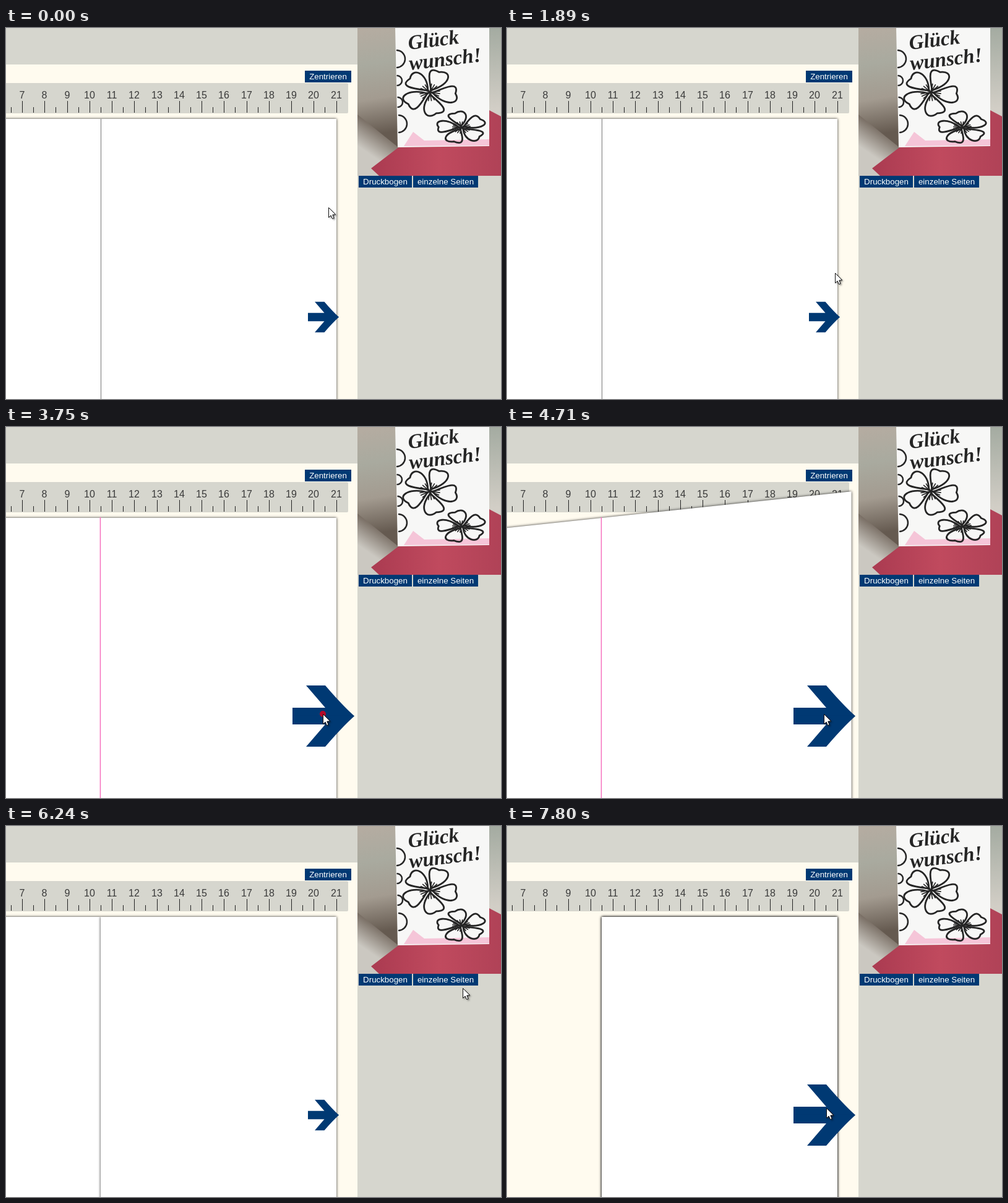
Write an HTML page with a canvas that moves like this. It is 800 px wide and 600 px high and loops after 8000 ms.

```html
<!DOCTYPE html>
<html lang="de">
<head>
<meta charset="utf-8">
<title>Karte wenden</title>
<style>
html, body { margin: 0; width: 100%; height: 100%; overflow: hidden; background: #d6d6ce; }
canvas { display: block; }
</style>
</head>
<body>
<canvas id="stage" width="800" height="600"></canvas>
<script>
const LOOP = 8000;
const GRAY = '#d6d6ce', CREAM = '#fffbef', NAVY = '#003973', INK = '#252525';
const SPINE = 153, HALF = 381, TOP = 147, MIDDLE = 685, DEPTH = 1000;
const SANS = '"Liberation Sans", Arial, sans-serif';
const ctx = document.getElementById('stage').getContext('2d');

const TURN_DELAY = 455, TURN_TIME = 600, GROW_TIME = 300, DOT_TIME = 300;
const [OPEN, BACK, CLOSE] = [2135, 3747, 6735];
const SINGLE_FROM = 6200;
const HOVERS = [[2030, 4990], [6705, LOOP + GROW_TIME]];
const REST = { x: 521, y: 290 };
const MOVES = [
  { at: 160, time: 800, x: 638, y: 242 },
  { at: 990, time: 350, x: 572, y: 243 },
  { at: 1550, time: 540, x: 512, y: 464 },
  { at: 4880, time: 500, x: 754, y: 248 },
  { at: 6150, time: 570, x: 516, y: 456 }
];

const ease = v => (v = Math.max(0, Math.min(1, v)), v * v * (3 - 2 * v));
const turned = (t, click) => ease((t - click - TURN_DELAY) / TURN_TIME);

function poly(c, fill, ...pts) {
  c.beginPath();
  pts.forEach(([x, y]) => c.lineTo(x, y));
  c.closePath();
  c.fillStyle = fill;
  c.fill();
}

function box(c, fill, x, y, w, h) {
  c.fillStyle = fill;
  c.fillRect(x, y, w, h);
}

function gradient(c, x0, y0, x1, y1, ...colors) {
  const g = c.createLinearGradient(x0, y0, x1, y1);
  colors.forEach((color, i) => g.addColorStop(i / (colors.length - 1), color));
  return g;
}

function label(c, text, x, y, font, fill) {
  c.font = font;
  c.fillStyle = fill;
  c.textAlign = 'center';
  c.fillText(text, x, y);
}

function button(c, text, x, y, w) {
  box(c, NAVY, x, y, w, 19);
  label(c, text, x + w / 2, y + 14, `13.333px ${SANS}`, '#fff');
}

function flower(c, cx, cy, rx, ry, lean) {
  for (let i = 0; i < 5; i++) {
    const at = (da, r) => {
      const a = lean + da + i * Math.PI * .4;
      return [cx + Math.cos(a) * rx * r, cy + Math.sin(a) * ry * r];
    };
    c.lineWidth = 2.8;
    c.beginPath();
    c.moveTo(...at(0, .1));
    c.bezierCurveTo(...at(-.5, .5), ...at(-.6, 1.2), ...at(-.1, .92));
    c.bezierCurveTo(...at(.25, 1.25), ...at(.7, .85), ...at(0, .1));
    c.stroke();
    c.lineWidth = 1.6;
    for (const d of [-.3, 0, .3]) {
      c.beginPath();
      c.moveTo(cx, cy);
      c.lineTo(...at(d, .36));
      c.stroke();
    }
  }
}

function lettering(c, text, x, y) {
  c.save();
  c.translate(x, y);
  c.rotate(-.12);
  label(c, text, 0, 0, 'italic bold 33px "Liberation Serif", Times, serif', INK);
  c.restore();
}

function photo(c) {
  c.save();
  c.beginPath();
  c.rect(568, 0, 232, 239);
  c.clip();
  box(c, gradient(c, 585, 0, 612, 170, '#b5aca1', '#a9aa9f', '#a39b90', '#655a50'), 568, 0, 70, 239);
  poly(c, gradient(c, 606, 165, 582, 200, '#766b61', '#cbc8c1'), [568, 140], [634, 193], [640, 239], [568, 239]);
  box(c, gradient(c, 781, 0, 781, 130, '#a4aba1', '#d2cec6'), 781, 0, 19, 145);
  poly(c, gradient(c, 600, 215, 800, 215, '#ac3c52', '#c04a5e', '#b04257'),
    [590, 227], [637, 191], [781, 191], [781, 133], [800, 143], [800, 239], [603, 239]);
  poly(c, '#f7f7f6', [629, 0], [781, 0], [781, 191], [633, 193]);
  poly(c, '#f5c5d8', [643, 191], [658, 168], [676, 182], [781, 180], [781, 190]);

  lettering(c, 'Glück', 692, 30);
  lettering(c, 'wunsch!', 711, 61);
  c.strokeStyle = INK;
  c.lineCap = 'round';
  flower(c, 685, 104, 45, 38, -1.1);
  flower(c, 736, 161, 40, 26, -.5);
  for (let i = 0; i < 4; i++) {
    const r = 10 + 4 * Math.cos(i * 2.1);
    c.lineWidth = 2.5;
    c.beginPath();
    c.ellipse(631 + i, 50 + i * 35, r, r, 0, -1.5, 1.5);
    c.stroke();
  }
  c.restore();
}

function scenery(c) {
  box(c, GRAY, 0, 0, 800, 600);
  box(c, CREAM, 0, 59, 568, 541);
  c.fillStyle = GRAY;
  c.beginPath();
  c.roundRect(-10, 89, 563, 49, 2);
  c.fill();
  for (let n = 6.5; n <= 21; n += .5) {
    const x = Math.floor(26.5 + (n - 7) * 36.25);
    const whole = n % 1 === 0;
    box(c, '#222', x, whole ? 118 : 128, 1, whole ? 19 : 9);
    if (whole) label(c, n, x, 114, `16px ${SANS}`, '#3a3a3a');
  }
  button(c, 'Zentrieren', 483, 69, 75);
  photo(c);
  button(c, 'Druckbogen', 570, 239, 86);
  button(c, 'einzelne Seiten', 658, 239, 105);
}

// Paper between two distances from the spine, turned about it.
function paper(from, to, angle) {
  const edge = u => {
    const k = 1 / (1 + u * Math.sin(angle) / DEPTH);
    const x = SPINE + u * Math.cos(angle) * k;
    const h = (MIDDLE - TOP) * k;
    return [[x, MIDDLE - h], [x, MIDDLE + h]];
  };
  const [a, b] = edge(from), [c, d] = edge(to);
  ctx.save();
  ctx.shadowColor = 'rgba(0,0,0,.85)';
  ctx.shadowBlur = 4;
  poly(ctx, '#fff', a, c, d, b);
  ctx.restore();
}

function spread(t) {
  const turns = turned(t, OPEN) + turned(t, BACK);
  paper(-HALF, HALF, turns % 1 * Math.PI);
  const inside = turns >= 1 && turns < 2;
  if (inside) box(ctx, '#f66fbd', SPINE - 1.3, TOP - 1, 1.5, 460);
  else box(ctx, '#777', SPINE, TOP, 1, 460);
}

function singlePages(t) {
  const angle = turned(t, CLOSE) * Math.PI;
  const leaves = [() => paper(-HALF, 0, angle), () => paper(0, HALF, 0)];
  if (angle > Math.PI / 2) leaves.reverse();
  leaves.forEach(leaf => leaf());
}

function sheet(t) {
  ctx.save();
  ctx.beginPath();
  ctx.rect(0, 59, 568, 541);
  ctx.clip();
  if (t < SINGLE_FROM) spread(t);
  else singlePages(t);
  ctx.restore();
}

function arrow(t) {
  let scale = .5;
  for (const [on, off] of HOVERS) {
    scale += (ease((t - on) / GROW_TIME) - ease((t - off) / GROW_TIME)) / 2;
  }
  ctx.save();
  ctx.translate(513, 467.5);
  ctx.scale(scale, scale);
  ctx.fillStyle = NAVY;
  for (const side of [-1, 1]) {
    ctx.beginPath();
    ctx.moveTo(-50, -side);
    ctx.lineTo(-50, side * 13.5);
    ctx.lineTo(3, side * 13.5);
    ctx.lineTo(-28, side * 49.5);
    ctx.lineTo(3, side * 49.5);
    ctx.quadraticCurveTo(30, side * 18, 50, 0);
    ctx.lineTo(48, -side);
    ctx.fill();
  }
  ctx.restore();
}

function cursorAt(t) {
  let { x, y } = REST;
  for (const move of MOVES) {
    const p = ease((t - move.at) / move.time);
    x += (move.x - x) * p;
    y += (move.y - y) * p;
  }
  return [Math.round(x), Math.round(y)];
}

function pointer(t) {
  const [x, y] = cursorAt(t);
  for (const click of [OPEN, BACK, CLOSE]) {
    const age = (t - click) / DOT_TIME;
    if (age < 0 || age > 1) continue;
    ctx.globalAlpha = .85 * (1 - age);
    ctx.fillStyle = '#d8001c';
    ctx.beginPath();
    ctx.arc(x, y, 5, 0, Math.PI * 2);
    ctx.fill();
    ctx.globalAlpha = 1;
  }
  ctx.save();
  ctx.translate(x + .5, y + .5);
  ctx.shadowColor = 'rgba(0,0,0,.5)';
  ctx.shadowBlur = 3;
  ctx.shadowOffsetX = ctx.shadowOffsetY = 2;
  poly(ctx, '#fff', [0, 0], [0, 16], [3.6, 12.6], [6, 18], [8.6, 17], [6.3, 11.6], [11.3, 11.3]);
  ctx.shadowColor = 'transparent';
  ctx.strokeStyle = '#111';
  ctx.lineWidth = 1;
  ctx.stroke();
  ctx.restore();
}

const backdrop = document.createElement('canvas');
backdrop.width = 800;
backdrop.height = 600;
scenery(backdrop.getContext('2d'));

const begin = performance.now();
function tick() {
  const t = (performance.now() - begin) % LOOP;
  ctx.drawImage(backdrop, 0, 0);
  sheet(t);
  arrow(t);
  pointer(t);
  requestAnimationFrame(tick);
}
tick();
</script>
</body>
</html>
```
